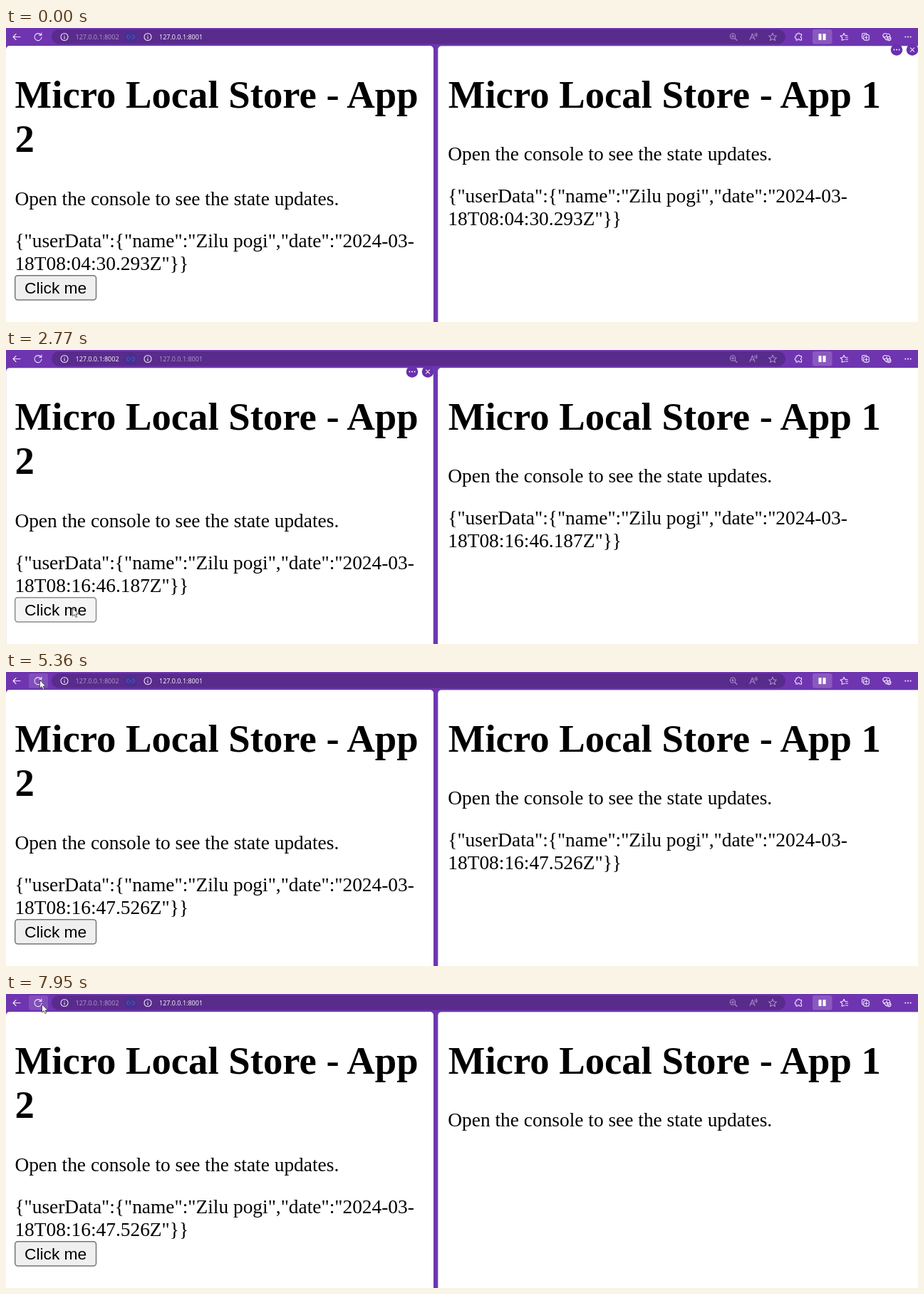
An HTML page that plays this animation: 1280x413 px, repeating every 8 s.

```html
<!DOCTYPE html>
<html lang="en">
<head>
<meta charset="utf-8">
<title>Micro Local Store</title>
<style>
  html, body { margin: 0; width: 100%; height: 100%; overflow: hidden; background: #6f35b0; }
  svg { display: block; width: 100%; height: 100%; }
  text { white-space: pre; }
  .h1 { font: bold 54.7px "Liberation Serif", serif; }
  .p { font: 27.4px "Liberation Serif", serif; }
  .url { font: 9px "Open Sans", sans-serif; }
  .label { font: 22.75px "Liberation Sans", sans-serif; }
  .icon { fill: none; stroke: #efe6f8; stroke-width: 1.1; stroke-linecap: round; stroke-linejoin: round; }
  .dim { stroke: #a88cc8; }
  .outline { fill: none; stroke: #5146c4; stroke-width: 1.4; }
</style>
</head>
<body>
<svg viewBox="0 0 1280 413" preserveAspectRatio="none">
  <defs>
    <g id="info"><circle r="5"/><path d="M0-.5V2.5M0-2.6V-2.5"/></g>
    <path id="star" d="M0-5.4 1.6-1.8 5.4-1.5 2.5 1.1 3.4 5 0 2.9-3.4 5-2.5 1.1-5.4-1.5-1.6-1.8Z"/>
    <g id="dots" fill="#fff"><circle cx="-3.6" r=".95"/><circle r=".95"/><circle cx="3.6" r=".95"/></g>
  </defs>

  <rect width="1280" height="413" fill="#6f35b0"/>
  <rect x="64" y="2" width="1030" height="20.5" rx="10" fill="#592b8c"/>
  <rect id="reloadBg" x="32" y="2" width="27" height="20.5" rx="3" fill="#fff"/>
  <rect x="1132" y="2" width="27.5" height="20.5" rx="3" fill="#8a59bf"/>

  <g class="icon">
    <path d="M20 12.5H10M14 8.5 10 12.5 14 16.5"/>
    <path d="M49.3 10A5 5 0 1 0 50 13M49.8 7V10.3H46.5"/>
    <use href="#info" x="82" y="12.5"/>
    <use href="#info" x="199" y="12.5"/>
  </g>
  <circle cx="175" cy="12.5" r="8.5" fill="#45308f"/>
  <path d="M173.5 10H172A2.5 2.5 0 0 0 172 15H173.5M176.5 10H178A2.5 2.5 0 0 1 178 15H176.5M173 12.5H177" fill="none" stroke="#5454c6" stroke-width="1.1"/>
  <text id="urlLeft" class="url" x="97.5" y="15.8">127.0.0.1:8002</text>
  <text id="urlRight" class="url" x="215" y="15.8">127.0.0.1:8001</text>

  <g class="icon dim">
    <circle cx="1020" cy="11.5" r="3.7"/><path d="M1023 14.5 1026 17.5M1018.3 11.5H1021.7M1020 9.8V13.2"/>
    <path d="M1044 16.5 1047.5 8 1051 16.5M1045.2 13.7H1049.8M1051 8Q1052.2 9.5 1051 11M1053 7Q1055 9.5 1053 12"/>
    <use href="#star" x="1076" y="12.5"/>
  </g>
  <g class="icon">
    <path d="M1109 8.5H1111A1.5 1.5 0 0 1 1114 8.5H1116.5V11A1.6 1.6 0 0 0 1116.5 14V17H1114A1.5 1.5 0 0 0 1111 17H1109V14.5A1.7 1.7 0 0 1 1109 11Z"/>
    <path d="M1141 8.5H1144V16.5H1141ZM1147 8.5H1150V16.5H1147Z" fill="#fff" stroke="#fff"/>
    <path d="M1177 16 1173 17.2 1173.7 13.5 1171 11 1174.5 10.5 1176 7.2 1177.6 10.5H1181M1178.5 13H1181.5M1178.5 16H1181.5"/>
    <path d="M1203.5 15H1203Q1201.5 15 1201.5 13.5V9Q1201.5 7.5 1203 7.5H1207Q1208.5 7.5 1208.5 9"/>
    <rect x="1203.7" y="9.5" width="7.6" height="7.6" rx="1.5"/><path d="M1207.5 11.5V15.1M1205.7 13.3H1209.3"/>
    <path d="M1236 17 1231.6 12.5A2.9 2.9 0 0 1 1236 8.7 2.9 2.9 0 0 1 1240.5 12M1232 12.5H1234.5L1236 10.5 1237.3 13.5"/>
    <circle cx="1239.3" cy="15" r="2.6"/><path d="M1238 15 1239 16 1240.6 14.2"/>
  </g>
  <use href="#dots" x="1266" y="12.5"/>

  <rect y="25" width="600" height="396" rx="5" fill="#fff"/>
  <rect x="606" y="25" width="680" height="396" rx="5" fill="#fff"/>
  <rect id="outlineLeft" class="outline" x="-.6" y="24.6" width="601" height="400" rx="5"/>
  <rect id="outlineRight" class="outline" x="605.6" y="24.6" width="681" height="400" rx="5"/>

  <text class="h1" x="12.6" y="112">Micro Local Store - App</text>
  <text class="h1" x="12.6" y="174">2</text>
  <text class="p" x="12.4" y="248.5">Open the console to see the state updates.</text>
  <g id="jsonLeft"></g>
  <rect id="button" x="12.7" y="347.7" width="113.8" height="34.4" rx="4" stroke-width="1.5"/>
  <text class="label" x="26" y="372.8">Click me</text>

  <text class="h1" x="620.8" y="112">Micro Local Store - App 1</text>
  <text class="p" x="620.3" y="186">Open the console to see the state updates.</text>
  <g id="jsonRight"></g>

  <g id="paneTools">
    <circle cx="-22" r="8.3" fill="#6a30ac"/><circle r="8.3" fill="#6a30ac"/>
    <use href="#dots" x="-22"/>
    <path class="icon" d="M-2.6-2.6 2.6 2.6M2.6-2.6-2.6 2.6"/>
  </g>

  <circle id="spot" cx="787" cy="105" r="7.5" fill="#f4e400"/>
  <g id="cursor">
    <path id="arrow" d="M0 0V11.4L2.6 9 4.4 13 6.2 12.2 4.5 8.4H8.2Z" fill="#fff" stroke="#333" stroke-width=".8"/>
    <path id="beam" d="M2 0H7M4.5 0V17M2 17H7" fill="none" stroke="#444" stroke-width="1"/>
  </g>
</svg>

<script>
const LOOP = 8000;
const $ = id => document.getElementById(id);
const set = (id, attrs) => {
  for (const name in attrs) $(id).setAttribute(name, attrs[name]);
};
const show = (id, visible) => set(id, { visibility: visible ? 'visible' : 'hidden' });

// Each table lists [start time, value]; a value holds until the next row.
const stamps = [
  [0, '04:30.293'], [1120, '16:45.537'], [1770, '16:46.187'],
  [2810, '16:47.231'], [2960, '16:47.379'], [3110, '16:47.526']
];
const activePane = [[0, 'right'], [1120, 'left'], [4230, 'right']];
const toolsX = [[0, 1272], [530, 592], [3360, 1272], [5160, null], [5900, 592], [6360, 1272], [7350, null]];
const buttonLook = [
  [0, 'idle'], [970, 'hover'], [1040, 'down'], [1120, 'hover'], [2710, 'down'], [2810, 'hover'],
  [2890, 'down'], [2960, 'hover'], [3050, 'down'], [3110, 'hover'], [3235, 'idle']
];
const reloadGlow = [[0, 0], [5290, .13], [5430, .22], [5500, .13], [5830, 0], [7420, .13], [7550, .22], [7680, .13]];
const rightJson = [[0, true], [5830, false], [5900, true], [7950, false]];
const pointer = [[0, ''], [310, 'arrow'], [3570, 'beam'], [4640, 'arrow'], [6430, 'beam'], [6690, 'arrow']];
const spotAlpha = [[0, 0], [4170, .9], [4230, .5], [4300, 0]];
const looks = {
  idle: { fill: '#efefef', stroke: '#767676' },
  hover: { fill: '#e5e5e5', stroke: '#4f4f4f' },
  down: { fill: '#f5f5f5', stroke: '#8d8d8d' }
};

// [start, end, steps, x, y]: each move begins where the previous one ended.
const origin = [655, 425];
const moves = [
  [310, 1040, 11, 93.5, 362.5],
  [3170, 3500, 6, 782, 100],
  [4570, 5360, 13, 47.5, 11.5],
  [5760, 6430, 11, 675, 181],
  [6690, 7490, 13, 50.5, 14.5]
];

const at = (table, t) => table.findLast(row => row[0] <= t)[1];
const ease = p => p < .5 ? 4 * p ** 3 : 1 - 4 * (1 - p) ** 3;

function cursorAt(t) {
  let [x, y] = origin;
  for (const [start, end, steps, toX, toY] of moves) {
    if (t < start) break;
    const gap = (end - start) / (steps - 1);
    const k = ease(Math.min(1, (Math.floor((t - start + 5) / gap) + 1) / steps));
    x += (toX - x) * k;
    y += (toY - y) * k;
  }
  return [x, y];
}

function addJson(id, x, y) {
  $(id).innerHTML =
    `<text class="p" x="${x}" y="${y}">{"userData":{"name":"Zilu pogi","date":"2024-03-</text>` +
    `<text class="p" x="${x}" y="${y + 32}"></text>`;
}

function draw(t) {
  const tail = `18T08:${at(stamps, t)}Z"}}`;
  for (const id of ['jsonLeft', 'jsonRight']) {
    const line = $(id).lastChild;
    if (line.textContent !== tail) line.textContent = tail;
  }
  show('jsonRight', at(rightJson, t));

  const active = at(activePane, t);
  for (const [side, name] of [['left', 'Left'], ['right', 'Right']]) {
    show('outline' + name, active === side);
    set('url' + name, { fill: active === side ? '#fff' : '#b29acb' });
  }

  const tools = at(toolsX, t);
  show('paneTools', tools !== null);
  if (tools !== null) set('paneTools', { transform: `translate(${tools} 30.5)` });

  set('button', looks[at(buttonLook, t)]);
  set('reloadBg', { opacity: at(reloadGlow, t) });
  set('spot', { opacity: at(spotAlpha, t) });

  const shape = at(pointer, t);
  show('arrow', shape === 'arrow');
  show('beam', shape === 'beam');
  set('cursor', { transform: `translate(${cursorAt(t)})` });
}

addJson('jsonLeft', 12.4, 307.5);
addJson('jsonRight', 620.3, 245);

const began = performance.now();
function tick() {
  draw((performance.now() - began) % LOOP);
  requestAnimationFrame(tick);
}
tick();
</script>
</body>
</html>
```
